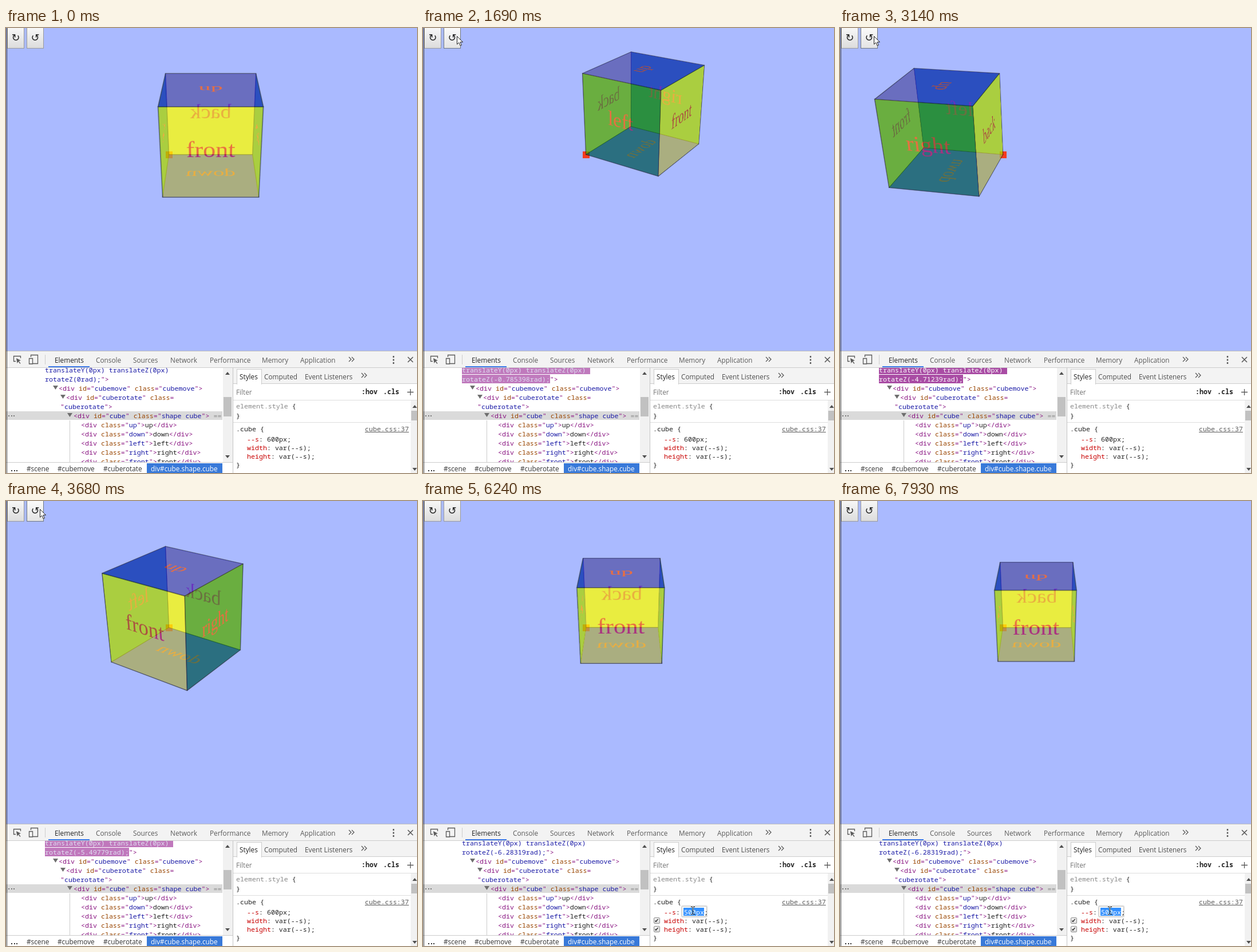
These frames come from a looping animation (718 by 779 pixels, 8 s). An HTML page:

```html
<!DOCTYPE html>
<html lang="en">
<head>
<meta charset="utf-8">
<title>Cube inspector</title>
<style>
html, body { margin: 0; width: 718px; height: 779px; overflow: hidden; background: #fff; }
#stage { position: absolute; inset: 0; width: 718px; height: 779px; overflow: hidden; isolation: isolate; background: #fff; }
#stage div, #stage svg, .t { position: absolute; }
.t { line-height: 16px; white-space: pre; font: 11.8px/16px "Open Sans", sans-serif; color: #4d4d4d; }
.m { font: 11.65px/16px "Noto Sans Mono", monospace; color: #222; }
.tag { color: #881280; } .att { color: #994500; } .val { color: #1a1aa6; }
.prop { color: #c80000; } .gray { color: #888; }
#scene { left: 0; top: 0; width: 718px; height: 565px; background: #aabaff; overflow: hidden; }
#pivot { left: 279px; top: 215.5px; width: 12px; height: 12px; background: #f53c1e; }
#stage .face { left: 0; top: 0; transform-origin: 0 0; opacity: .5; box-shadow: inset 0 0 0 .6px #000, 0 0 0 .7px #000;
  color: red; font: 45px "Liberation Serif", serif; text-align: center; }
.face span { position: absolute; left: 0; width: 100%; }
.btn { top: -1px; width: 28px; height: 35px; border: 1px solid #9b9b9b; background: linear-gradient(#f7f7f7, #dcdcdc);
  font: 18px/33px "DejaVu Sans", sans-serif; text-align: center; color: #222; }
.btn.on { border-color: #6f7780; background: linear-gradient(#fafafa, #e4e4e4); }
.arrow { width: 0; height: 0; border: 4px solid transparent; }
.down { border-top: 5px solid #505050; border-bottom: 0; }
.up { border-bottom: 5px solid #505050; border-top: 0; }
.check { left: 403px; width: 9px; height: 9px; border: 1px solid #8c8c8c; border-radius: 2px;
  background: linear-gradient(#f4f4f4, #dcdcdc); font: bold 10px/9px "DejaVu Sans", sans-serif; color: #333; text-align: center; }
#edit { left: 453px; top: 710px; width: 42px; height: 17px; background: #fff; box-shadow: 0 0 2px 1px #aaa; }
#edit div { left: 2px; top: 2px; width: 36px; height: 14px; background: #3390ff; }
#beam { mix-blend-mode: difference; }
</style>
</head>
<body>
<div id="stage"></div>
<script>
const LOOP = 8000, FRAME = 76.667;
const stage = document.getElementById('stage');

function add(parent, html) {
  parent.insertAdjacentHTML('beforeend', html);
  return parent.lastElementChild;
}
const box = (x, y, w, h, color, extra = '') =>
  add(stage, `<div style="left:${x}px;top:${y}px;width:${w}px;height:${h}px;background:${color};${extra}"></div>`);
const text = (x, mid, html, cls = '', parent = stage) =>
  add(parent, `<span class="t ${cls}" style="left:${x}px;top:${mid - 8}px">${html}</span>`);
const tri = (x, y, cls = 'down') => add(stage, `<div class="arrow ${cls}" style="left:${x - 4}px;top:${y - 2}px"></div>`);
const svg = (x, y, w, h, body) =>
  add(stage, `<svg style="left:${x}px;top:${y}px" width="${w}" height="${h}" fill="none" stroke="#5a5a5a" stroke-width="1.3">${body}</svg>`);

// ---- scene ----
const scene = add(stage, '<div id="scene"><div id="pivot"></div></div>');
const UNIT = 180;            // local pixels for a 600px edge
const faces = [
  // name, colour, origin (times size), u axis, v axis
  ['up', '#00f', [0, 0, 1], [1, 0, 0], [0, 1, 0]],
  ['down', '#00f', [1, 0, 0], [-1, 0, 0], [0, 1, 0]],
  ['left', 'green', [0, 0, 1], [0, 1, 0], [0, 0, -1]],
  ['right', 'green', [1, 1, 1], [0, -1, 0], [0, 0, -1]],
  ['front', '#ff0', [0, 1, 1], [1, 0, 0], [0, 0, -1]],
  ['back', '#ff0', [1, 0, 1], [-1, 0, 0], [0, 0, -1]]
].map(([name, color, o, u, v]) => {
  const el = add(scene, `<div class="face" style="background:${color}"><span>${name}</span></div>`);
  return { el, label: el.firstChild, o, u, v };
});

// Homogeneous screen coordinates of a point (w = 1) or a direction (w = 0).
function project([x, y, z], w, angle) {
  const c = Math.cos(angle), s = Math.sin(angle);
  const px = x * c + y * s, py = y * c - x * s;
  const q = .006849 * w - .000896 * py - .000519 * z;
  const sx = px - .5 * w, sy = .5 * py - .866 * z - .421 * w;
  return [357.6 * q + sx, 282.9 * q + sy, q].map(n => n * 150);
}

function drawCube(angle, size) {
  const r = size / 600;
  for (const f of faces) {
    const o = project(f.o.map(n => n * r), 1, angle);
    const u = project(f.u, 0, angle).map(n => n / UNIT);
    const v = project(f.v, 0, angle).map(n => n / UNIT);
    f.el.style.width = f.el.style.height = r * UNIT + 'px';
    f.el.style.transform = `matrix3d(${[u[0], u[1], 0, u[2], v[0], v[1], 0, v[2], 0, 0, 1, 0, o[0], o[1], 0, o[2]]
      .map(n => n.toFixed(9))})`;
    f.label.style.top = r * UNIT * .22 + 15.6 + 'px';
    // Sign of the 3x3 determinant tells whether the face looks at the viewer.
    const det = o[0] * (u[1] * v[2] - u[2] * v[1]) - o[1] * (u[0] * v[2] - u[2] * v[0]) + o[2] * (u[0] * v[1] - u[1] * v[0]);
    f.el.style.zIndex = det > 0 ? 2 : 1;
  }
}

const buttons = [['↻', 2], ['↺', 36]].map(([glyph, x]) => add(stage, `<div class="btn" style="left:${x}px">${glyph}</div>`));

// ---- toolbar ----
box(0, 565, 718, 30, '#f3f3f3', 'box-sizing:border-box;border-top:1px solid #bbb;border-bottom:1px solid #ccc');
svg(12, 573, 17, 17, '<path d="M5 10.500H1.500V1.500H13.500V5"/><path d="M6 5l8 4-3.500 1 3 4-1 1-3-4-2 3z" fill="#5a5a5a" stroke="none"/>');
svg(39, 571, 19, 19, '<path d="M4.500 5V1.500H16.500V16.500H8"/><path d="M1.500 7.500H7.500V17H1.500z"/>');
box(68, 572, 1, 17, '#ccc');
box(74, 592, 72, 2, '#3b78e7');
[['Elements', 85], ['Console', 157], ['Sources', 222], ['Network', 287], ['Performance', 356], ['Memory', 447], ['Application', 514]]
  .forEach(([s, x], i) => text(x, 580.5, s).style.color = i ? '#5a5a5a' : '#222');
const more = (x, y) => svg(x, y, 12, 10, '<path d="M1 1l4 4-4 4M6 1l4 4-4 4"/>');
const dots = (x, y) => svg(x, y, 4, 14, '<path d="M2 0v3M2 5.500v3M2 11v3" stroke-width="2.400"/>');
more(598, 575);
dots(675, 574);
svg(701, 575, 11, 11, '<path d="M1 1l9 9M10 1l-9 9" stroke-width="1.600"/>');

// ---- element tree ----
const tree = box(0, 595, 378, 165, '#fff', 'overflow:hidden');
const ROW = 16.05;
const row = (i, x, html) => text(x, 3.5 + ROW * i, html, 'm tag', tree);
const attr = (name, value) => ` <span class="att">${name}</span>="<span class="val">${value}</span>"`;
add(tree, '<div style="left:0;top:76px;width:378px;height:15px;background:#dadada"></div>');
add(tree, '<div style="left:111px;top:92px;width:1px;height:80px;background:#ccc"></div>');
const styleA = row(0, 68, '<span class="val">translateY(0px) translateZ(0px) </span>').firstChild;
const styleB = row(1, 68, '<span class="val"></span>"&gt;').firstChild;
row(2, 92, `&lt;div${attr('id', 'cubemove')}${attr('class', 'cubemove')}&gt;`);
row(3, 105, `&lt;div${attr('id', 'cuberotate')} <span class="att">class</span>=`);
row(4, 95, '"<span class="val">cuberotate</span>"&gt;');
row(5, 118, `&lt;div${attr('id', 'cube')}${attr('class', 'shape cube')}&gt;<span class="gray"> == $0</span>`);
['up', 'down', 'left', 'right', 'front'].forEach((n, i) =>
  row(6 + i, 131, `&lt;div${attr('class', n)}&gt;<span style="color:#222">${n}</span>&lt;/div&gt;`));
[[86, 629], [99, 645], [111, 677]].forEach(([x, y]) =>
  box(x - 4, y - 3, 9, 7, '#6e6e6e', 'clip-path:polygon(0 0,100% 0,50% 100%)'));
[4, 8.5, 13].forEach(x => box(x, 677.5, 2, 2, '#777'));

box(379, 595, 17, 165, '#f1f1f1');
box(380, 646, 14, 34, '#c1c1c1');
tri(387, 604, 'up');
tri(387, 750);

// ---- breadcrumbs ----
box(0, 760, 397, 19, '#fff', 'box-sizing:border-box;border-top:1px solid #ccc');
box(246, 762, 132, 17, '#3879d9');
[['#scene', 36], ['#cubemove', 90], ['#cuberotate', 170], ['div#cube.shape.cube', 253]]
  .forEach(([s, x], i) => text(x, 771, s).style.color = i === 3 ? '#fff' : '#333');
[9, 13.5, 18].forEach(x => box(x, 774, 2, 2, '#333'));

// ---- styles pane ----
box(396, 595, 1, 184, '#c4c4c4');
box(397, 595, 321, 28, '#f3f3f3', 'box-sizing:border-box;border-bottom:1px solid #ccc');
box(403, 597, 42, 26, '#fff', 'border:1px solid #ccc;border-bottom:0');
text(408, 610, 'Styles').style.color = '#222';
text(451, 610, 'Computed');
text(522, 610, 'Event Listeners');
more(620, 603);
text(402, 637, 'Filter').style.color = '#757575';
text(621, 637, '<b>:hov</b>', 'm');
text(659, 637, '<b>.cls</b>', 'm');
svg(701, 632, 11, 11, '<path d="M5.500 0v11M0 5.500h11"/>');
box(397, 651, 321, 1, '#ddd');
text(402, 662, '<span class="gray">element.style</span> {', 'm');
text(402, 679, '}', 'm');
box(397, 690, 310, 1, '#ddd');
text(402, 702, '.cube {', 'm');
text(627, 702, '<u>cube.css:37</u>', 'm').style.color = '#5a5a5a';
text(421, 719.5, '<span class="prop">--s</span>:', 'm');
text(421, 735, '<span class="prop">width</span>: var(--s);', 'm');
text(421, 750, '<span class="prop">height</span>: var(--s);', 'm');
text(402, 765, '}', 'm');
box(707, 652, 11, 127, '#f1f1f1');
box(708, 670, 10, 17, '#c1c1c1');
tri(714, 662, 'up');
tri(714, 772);
const checks = [713, 729, 744].map(y => add(stage, `<div class="check" style="top:${y}px">✔</div>`));
const sectionDots = dots(687, 756);
const edit = add(stage, '<div id="edit"><div></div></div>');
const sizeText = text(456, 719.5, '', 'm');
text(491, 719.5, ';', 'm');
box(1, 0, 1, 779, '#333');   // window edge

// ---- pointers ----
const arrow = add(stage, `<svg width="13" height="19"><path d="M.5.5v14l3.300-3 2.400 5.500 2.200-1-2.400-5.300h4.500z" fill="#fff" stroke="#222"/></svg>`);
const beam = add(stage, `<svg id="beam" width="9" height="14" fill="none" stroke="#fff"><path d="M1 .5h2.500l1 1 1-1H8M4.500 1v12M1 13.500h2.500l1-1 1 1H8"/></svg>`);

// ---- timeline ----
const TURN = Math.PI / 4, STEP = 250, FADE = 1120, BEAM_AT = 4750, EDIT_AT = 5110;
const turns = Array.from({ length: 8 }, (_, k) => 1286 + 333.3 * k);
const sizes = [[6005, -100], [6343, -100], [6650, -100], [7400, 100], [7672, 100]];
const path = [[70, 470, 772], [300, 455, 705], [450, 330, 420], [620, 120, 90], [700, 22, 18], [840, 59, 14],
  [3720, 59, 14], [3900, 300, 330], [4140, 684, 648], [4490, 684, 648], [4750, 520, 705], [4900, 472, 717]];

const clamp = n => Math.max(0, Math.min(1, n));
const mix = (a, b, p) => a + (b - a) * p;
const rgb = (a, b, p) => `rgb(${a.map((n, i) => Math.round(mix(n, b[i], p)))})`;

function pointer(t) {
  const i = path.findIndex(p => p[0] > t);
  if (i < 0) return path[path.length - 1].slice(1);
  const a = path[Math.max(0, i - 1)], b = path[i];
  const p = clamp((t - a[0]) / (b[0] - a[0]));
  return [mix(a[1], b[1], p), mix(a[2], b[2], p)];
}

function flash(age) {
  const p = 1 - (1 - clamp(age / FADE)) ** 1.5;
  const done = age >= FADE;
  for (const el of [styleA, styleB]) {
    el.style.background = done ? 'none' : rgb([158, 54, 153], [250, 235, 249], p);
    el.style.color = done ? '' : rgb([255, 255, 255], [26, 26, 166], p * p);
  }
}

const show = (el, on) => el.style.visibility = on ? 'visible' : 'hidden';

function draw(t) {
  const angle = turns.reduce((sum, start) => sum + TURN * clamp((t - start) / STEP), 0);
  const size = sizes.reduce((sum, [start, d]) => sum + d * clamp((t - start) / STEP), 600);
  drawCube(angle, size);

  const written = turns.filter(start => t >= start + 100).length;
  styleB.textContent = `rotateZ(${written ? -Number((written * TURN).toPrecision(6)) : 0}rad);`;
  flash(written ? t - turns[written - 1] - 100 : LOOP);

  const [x, y] = pointer(t);
  const useBeam = t >= BEAM_AT, editing = t >= EDIT_AT;
  show(arrow, t >= 69 && !useBeam);
  arrow.style.left = x + 'px';
  arrow.style.top = y + 'px';
  show(beam, useBeam);
  beam.style.left = x - 4.5 - (t > 5510 ? 1 : 0) + 'px';
  beam.style.top = y - 7 + 'px';
  buttons.forEach((b, i) => b.classList.toggle('on', t > 69 && y < 35 && x > 2 + 34 * i && x < 32 + 34 * i));

  const hover = t >= 69 && x > 397 && y > 691;
  checks.forEach((c, i) => show(c, hover && (i || !editing)));
  show(sectionDots, hover && !editing);
  show(edit, editing);
  sizeText.textContent = sizes.reduce((sum, [start, d]) => sum + (t >= start ? d : 0), 600) + 'px';
  sizeText.style.color = editing ? '#fff' : '';
}

const begin = performance.now();
function tick() {
  const t = (performance.now() - begin) % LOOP;
  draw(Math.floor((t + 12) / FRAME) * FRAME);
  requestAnimationFrame(tick);
}
tick();
</script>
</body>
</html>
```
